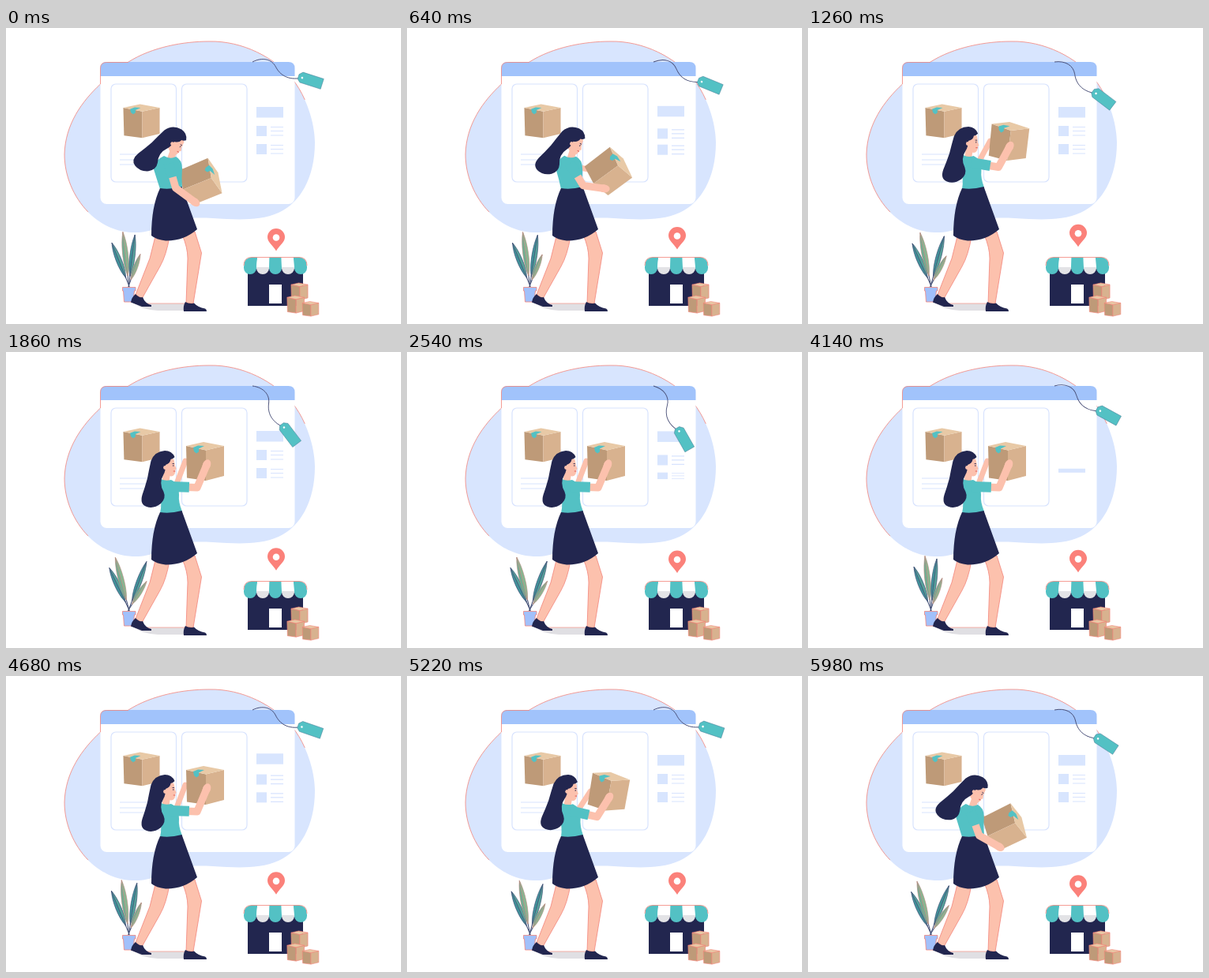
Write an HTML page that moves like this. It is 500x375 px and loops after 6 s.

```html
<!DOCTYPE html>
<html lang="en">
<head>
<meta charset="utf-8">
<title>Online shop</title>
<style>
  html, body { margin: 0; width: 100%; height: 100%; overflow: hidden; background: #fff; }
  svg { display: block; width: 500px; height: 375px; }
  .pale { fill: #d8e5fe; }
  .navy { fill: #22264f; }
  .teal { fill: #53c1c4; }
  .skin { fill: #fcc1ad; }
  .edge { stroke: #f3857a; stroke-width: .8; }
  .line { fill: none; stroke: #d8e3fe; stroke-width: 1.2; }
  .limb { fill: none; stroke: #fcc1ad; stroke-linecap: round; stroke-linejoin: round; }
</style>
</head>
<body>
<svg viewBox="0 0 500 375">
  <defs>
    <g id="carton">
      <path fill="#be9a78" d="M-24-20 L1-14.500 V24 L-23 20.500Z"/>
      <path fill="#d8b28f" d="M1-14.500 L24-20 V18 L1 24Z"/>
      <path fill="#e8c9a6" d="M-24-20 L-2-25 L24-20 L1-14.500Z"/>
    </g>
    <g id="taped">
      <use href="#carton"/>
      <path class="teal" d="M-15-18 L-9-20.500 L-1-20 L-5-18 L-8-16.500 L-8-12.500 L-11-10.500 L-14-13Z"/>
    </g>
    <g id="rows">
      <rect class="pale" x="317" width="13" height="13"/>
      <path class="line" d="M335 1.500H351M335 6.500H351M335 12H351"/>
    </g>
    <clipPath id="roof"><rect x="301" y="290.500" width="80" height="30" rx="10"/></clipPath>
  </defs>

  <path class="pale edge" pathLength="100" stroke-dasharray="45 46 9 0" d="M74 160C75 122 96 93 119.500 71C135 57 145 50 155 43C185 24 225 17 257 17C300 16 340 38 362 64C380 86 391 120 391 145C391 190 372 222 345 234C325 243 300 243 280 242C255 241 240 239 222 243C195 250 185 260 160 259C110 257 74 208 74 160Z"/>

  <!-- browser window -->
  <rect x="119.500" y="43" width="246" height="180" rx="8" fill="#fff"/>
  <path fill="#a1c3fb" d="M119.500 61V51Q119.500 43 127.500 43H357.500Q365.500 43 365.500 51V61Z"/>
  <path class="edge" fill="none" d="M119.500 71V51Q119.500 43.500 127.500 43.500H155"/>
  <rect class="line" x="133" y="71" width="82.500" height="124" rx="6"/>
  <rect class="line" x="222.500" y="71" width="82.500" height="124" rx="6"/>
  <path class="line" d="M144 160H190M144 167H190M144 173H190"/>
  <use href="#taped" transform="translate(171.500 118.300) scale(.96 .87)"/>
  <g id="widgets">
    <rect class="pale" x="317" width="34" height="13.500"/>
    <use href="#rows"/>
    <use href="#rows"/>
  </g>

  <g id="tag">
    <path fill="none" stroke="#4a5078" stroke-width=".9" d="M0 0C10-10 22-11 30-3S50 9 66 0"/>
    <path class="teal" stroke="#4a7f98" stroke-width=".5" d="M61-3L65-7H92.500V6.500H65L61 3Z"/>
    <circle cx="66" r="1.300" fill="#fff"/>
  </g>

  <!-- shop -->
  <g id="pin">
    <path fill="#fb817a" d="M0 28C-4 21-11 17-11 10.500A11 11 0 0 1 11 10.500C11 17 4 21 0 28Z"/>
    <circle cy="11" r="4.300" fill="#fff"/>
  </g>
  <path class="navy" d="M306 305H376V352H306Z"/>
  <path fill="#fff" d="M333 325H349V349H333Z"/>
  <g id="awning" clip-path="url(#roof)"></g>
  <path class="edge" fill="none" d="M301 301Q301 290.500 311 290.500H371Q381 290.500 381 301"/>
  <g stroke="#f3857a" stroke-width="1.500">
    <use href="#carton" transform="translate(371.500 334) scale(.44)"/>
    <use href="#carton" transform="translate(366.700 350.300) scale(.45)"/>
    <use href="#carton" transform="translate(385.500 356) scale(.43 .38)"/>
  </g>

  <!-- plant -->
  <g id="plant"></g>
  <path class="edge" fill="#a1c0fb" d="M147.500 328.500H164V333H162.500L161 347H149.500L148.500 333H147.500Z"/>

  <!-- woman -->
  <path fill="#e0dfe3" d="M163 349H228V358H192Q172 357 163 349Z"/>
  <path stroke="#f3a59c" stroke-width=".9" d="M163 349H228"/>
  <path class="skin edge" d="M189 264L182 292L164 338L172 343L195 302Q203 288 207 264Z"/>
  <path class="skin edge" d="M223 262Q230 278 230 292L228 349H237L247.500 285L239 258Z"/>
  <path class="navy" d="M164 337Q168 342 173 341Q176 349 184 351V353H172L158 347.500Q159 341 164 337Z"/>
  <path class="navy" d="M227 347Q232 350 238 348.500Q243 354 252 355.500Q254 356 254 359H225Q224 352 227 347Z"/>
  <path id="farArm" class="limb" stroke-width="7"/>
  <use id="box" href="#taped"/>
  <path id="neck" class="limb" stroke-width="9"/>
  <path id="shirt" class="teal"/>
  <path class="navy" d="M195 203Q208 205 222.500 201L242 255Q225 270 202 269.500Q190 268 184 263Q184 226 195 203Z"/>
  <g id="head">
    <path class="skin" d="M200 136Q207 133 212.500 136L214 144L215.800 148L214.300 149.500Q214.500 157 209.500 157.500Q204 157 199 153Z"/>
    <path class="navy" d="M213.500 133Q210 125 201 125Q188 126 183.500 138Q181 149 179 160Q176 171 172.500 181Q169 193 178 196Q187 199 196 192Q203 185 199.500 177Q193 166 199.500 155Q202 151 202 143Q208 141 208.500 136Q211 136 213.500 133Z"/>
    <circle class="skin" cx="201.500" cy="146.500" r="2.400"/>
    <path fill="none" stroke="#22264f" stroke-width=".8" d="M210.500 141.500H213M211.800 143V145"/>
    <path stroke="#e4655f" stroke-width="1.100" d="M211.800 151H214.300"/>
  </g>
  <path id="arm" class="limb" stroke-width="9.500"/>
  <ellipse id="hand" class="skin" rx="7" ry="5"/>
  <path id="sleeve" fill="none" stroke="#53c1c4" stroke-width="13"/>
</svg>

<script>
const LOOP = 6000;
const $ = id => document.getElementById(id);
const set = (el, name, value) => el.setAttribute(name, value);
const lerp = (a, b, k) => a + (b - a) * k;
const mix = (p, q, k) => p.map((v, i) => lerp(v, q[i], k));
const clamp = v => Math.min(1, Math.max(0, v));
const ease = u => (1 - Math.cos(Math.PI * clamp(u))) / 2;
const wave = (t, peak, period) => Math.cos(2 * Math.PI * (t - peak) / period);

function add(parent, tag, attrs) {
  const el = document.createElementNS("http://www.w3.org/2000/svg", tag);
  for (const name in attrs) set(el, name, attrs[name]);
  return parent.appendChild(el);
}

for (let i = 0; i < 5; i++) {
  const top = 303 + i * 15.2, low = 301 + i * 16, odd = i % 2;
  const color = odd ? "#e3e3e6" : "#53c1c4";
  add($("awning"), "path", { fill: color, d: `M${low} 302V304A8 8 0 0 0 ${low + 16} 304V302Z` });
  add($("awning"), "path", {
    fill: odd ? "#fff" : color,
    d: `M${top} 290H${top + 15.2}L${low + 16} 303H${low}Z`
  });
}

// length, half width, closed angle, open angle, is green
const leaves = [
  [58, 4.2, -21.7, -25.3, 0], [68, 4.2, -6.3, -15, 1],
  [64.5, 4, 6.7, 21, 0], [42, 3.2, 20, 33, 1]
].map(([len, w, shut, open, green]) => {
  const g = add($("plant"), "g", { stroke: green ? "#b98a80" : "#3d4a72", "stroke-width": .6 });
  const half = side =>
    `M0 ${-len}C${side * w} ${-len * .8} ${side * w * 1.2} ${-len * .4} 0 ${-len * .18}Z`;
  add(g, "path", { d: `M0 2V${-len * .2}`, stroke: "#3d4a72", "stroke-width": 1 });
  add(g, "path", { fill: green ? "#6fae93" : "#41939a", d: half(-1) });
  add(g, "path", { fill: green ? "#86b892" : "#56a39a", d: half(1) });
  return { g, shut, open };
});

const widgets = [...$("widgets").children].map((el, i) => ({
  el, top: [100, 124, 147][i], h: [13.5, 13, 13][i], delay: [0, 190, 340][i]
}));

function drawWidgets(t) {
  const phase = (t - 160 + 1970) % 1970;
  for (const { el, top, h, delay } of widgets) {
    const age = Math.max(0, phase - delay);
    const u = clamp(age / 850) - 1;
    const rise = 1 + 2 * u ** 3 + u ** 2;
    const grow = clamp(age / 110);
    const bottom = lerp(161.5, top + h, rise);
    set(el, "transform", `translate(0 ${bottom - h * grow}) scale(1 ${grow})`);
  }
}

function bezier(a, b, c, d, k) {
  const ab = mix(a, b, k), bc = mix(b, c, k), cd = mix(c, d, k);
  return mix(mix(ab, bc, k), mix(bc, cd, k), k);
}

function drawWoman(t) {
  const s = ease((t - 260) / 1260) - ease((t - 4900) / 1260);
  const [bx, by] = bezier([246, 194.5], [265, 174], [259, 156], [252, 139], s);
  set($("box"), "transform", `translate(${bx} ${by}) rotate(${68 * (1 - s)})`);

  const [hx, hy] = mix([216, 148.5], [207, 145], s);
  set($("head"), "transform",
    `translate(${hx} ${hy}) rotate(${34 * (1 - s)}) translate(-207 -145)`);
  const collar = mix([208, 167], [202, 164], s);
  set($("neck"), "d", `M${collar}L${hx - 3} ${hy + 5}`);

  const nape = mix([200, 162], [196, 161], s);
  const throat = mix([215, 163], [209, 162], s);
  const chest = mix([223, 178], [219, 181], s);
  const back = mix([187, 179], [194, 178], s);
  set($("shirt"), "d", `M${nape}Q${collar} ${throat}Q${chest[0]} ${throat[1] + 4} ${chest}` +
    `Q${chest[0] - 1} 190 223 202Q208 206 195 204Q${back[0] + 4} 192 ${back}` +
    `Q${back[0]} 168 ${nape}Z`);

  const shoulder = mix([206, 172], [207, 170.5], s);
  const turn = lerp(74, 2, s) * Math.PI / 180;
  const reach = lerp(32, 35, s);
  const along = k => [shoulder[0] + reach * k * Math.cos(turn), shoulder[1] + reach * k * Math.sin(turn)];
  const elbow = along(1);
  const hand = [bx + lerp(-7, 2, s), by + lerp(26, 4, s)];
  const aim = Math.atan2(hand[1] - elbow[1], hand[0] - elbow[0]) * 180 / Math.PI;
  const cuff = lerp(.55, .71, s);
  set($("arm"), "d", `M${along(cuff - .1)}L${elbow}L${hand}`);
  set($("sleeve"), "d", `M${shoulder}L${along(cuff)}`);
  set($("hand"), "transform", `translate(${hand}) rotate(${aim})`);
  set($("farArm"), "d", `M${mix([218, 178], [214, 172], s)}L${bx + lerp(-10, -25, s)} ${by - 1}`);
}

function draw(t) {
  set($("tag"), "transform", `translate(312 43) rotate(${39 - 21.5 * wave(t, 110, 4860)})`);
  set($("pin"), "transform", `translate(342 ${251.5 + 3 * wave(t, 3290, 3300)})`);
  const spread = (1 - wave(t, 140, 4000)) / 2;
  for (const { g, shut, open } of leaves)
    set(g, "transform", `translate(155.500 326) rotate(${lerp(shut, open, spread)})`);
  drawWidgets(t);
  drawWoman(t);
}

const start = performance.now();
function tick() {
  draw((performance.now() - start) % LOOP);
  requestAnimationFrame(tick);
}
tick();
</script>
</body>
</html>
```
